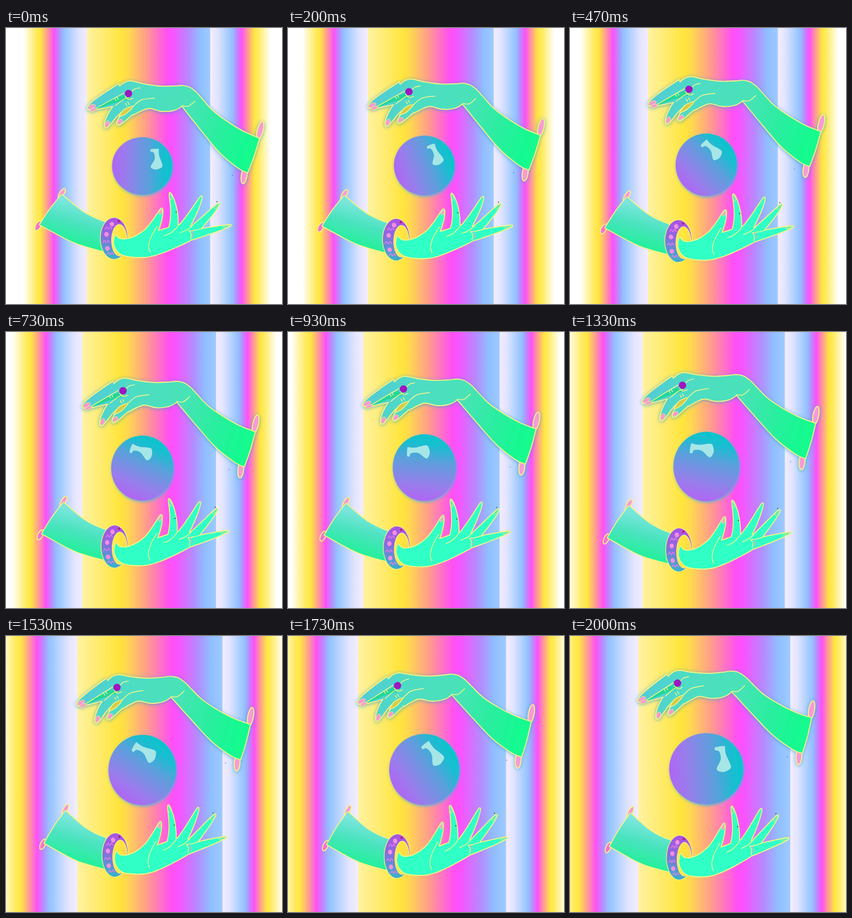
An HTML page that plays this animation: 480 by 480 pixels, repeating every 2070 ms.

```html
<!DOCTYPE html>
<html lang="en">
<head>
<meta charset="utf-8">
<title>Hands and orb</title>
<style>
html, body { margin: 0; width: 100%; height: 100%; overflow: hidden; background: #fff; }
svg { display: block; width: 100vw; height: 100vh; }
.line { fill: none; stroke: #f3f58c; stroke-width: 1.4; stroke-linecap: round; }
.rim { fill: none; stroke: #f6f383; stroke-width: 3.4; stroke-linejoin: round; }
.nail { fill: #f49ad2; stroke: #f6e98a; stroke-width: .8; }
.tip { fill: #4cf0bc; }
.cuff { fill: #f79ad8; stroke: #f6f383; stroke-width: 1.8; }
.hot { fill: #f672d2; }
.charm { fill: #f48fe0; }
.squiggle { fill: none; stroke: #f07be6; stroke-width: 1.4; }
</style>
</head>
<body>
<svg viewBox="0 0 480 480" preserveAspectRatio="none">
  <defs id="defs">
    <filter id="halo" x="-20%" y="-20%" width="140%" height="140%">
      <feDropShadow dx="0" dy="1" stdDeviation="3" flood-color="#2f9fc8" flood-opacity=".75"/>
    </filter>
    <filter id="orbHalo" x="-20%" y="-20%" width="140%" height="140%">
      <feDropShadow dx="1" dy="2" stdDeviation="2.4" flood-color="#46b4e0" flood-opacity=".9"/>
    </filter>
  </defs>
  <rect id="left" width="300" height="480" fill="url(#side)"/>
  <rect id="right" width="300" height="480" fill="url(#side)"/>
  <rect id="mid" width="1" height="480" fill="url(#center)"/>
  <g filter="url(#orbHalo)"><g id="orb"></g></g>
  <g id="lower"></g>
  <g filter="url(#halo)"><g id="upper"></g></g>
</svg>
<script>
const $ = id => document.getElementById(id);
const NS = 'http://www.w3.org/2000/svg';
const mix = (a, b, p) => a + (b - a) * p;

function add(parent, tag, attrs) {
  const el = document.createElementNS(NS, tag);
  for (const k in attrs) el.setAttribute(k, attrs[k]);
  return parent.appendChild(el);
}

function gradient(id, [x1, y1, x2, y2], stops) {
  const g = add($('defs'), 'linearGradient', { id, x1, y1, x2, y2, gradientUnits: 'userSpaceOnUse' });
  for (const s of stops.split(', ')) {
    const [color, offset] = s.split(' ');
    add(g, 'stop', { 'stop-color': color, offset });
  }
}

gradient('side', [0, 0, 111, 0],
  '#f3edff 0, #e2e4ff .12, #a5ccff .3, #94bfff .37, #b98bff .44, #ff50f8 .52, #ff9a96 .62, #ffe640 .73, #ffeb62 .8, #fff 1');
gradient('center', [0, 0, 1, 0],
  '#fff2a2 0, #ffe53c .28, #ffd850 .34, #ff9c8c .48, #ff50f4 .65, #f754ff .7, #b48cff .83, #90bfff .92, #9fcaff 1');
gradient('ball', [-1, 0, 1, 0], '#b065f4 0, #9a7cec .22, #5c9fdc .6, #16bfd0 .86, #0cc4cc 1');
gradient('jade', [150, 120, 425, 215], '#52cbd8 0, #4edcc4 .25, #4ae2b8 .55, #2eeca2 .75, #12fb8e 1');
gradient('sleeve', [130, 308, 112, 374], '#7ae6dc 0, #4ce3c0 .45, #22f09a 1');
gradient('band', [205, 332, 176, 402], '#b04fe4 0, #8a6ade .5, #2cbcc8 1');

// Smooth path through "x,y x,y ..." points; "|" marks a sharp corner.
function smooth(text) {
  let d = '', last;
  for (const run of text.split('|')) {
    const p = run.trim().split(/\s+/).map(s => s.split(',').map(Number));
    if (last) p.unshift(last);
    else d = 'M' + p[0];
    for (let i = 0; i < p.length - 1; i++) {
      const a = p[i - 1] || p[i], b = p[i], c = p[i + 1], e = p[i + 2] || c;
      const h1 = b.map((v, k) => v + (c[k] - a[k]) / 6);
      const h2 = c.map((v, k) => v - (e[k] - b[k]) / 6);
      d += `C${h1} ${h2} ${c}`;
    }
    last = p[p.length - 1];
  }
  return d;
}

// Tapered finger along a curve from base over bend to tip, half width w0 to w1.
function finger([x0, y0], [cx, cy], [x1, y1], w0, w1) {
  const near = [], far = [], n = 16;
  for (let i = 0; i <= n; i++) {
    const t = 1 - (1 - i / n) ** 2, u = 1 - t;
    const x = u * u * x0 + 2 * u * t * cx + t * t * x1;
    const y = u * u * y0 + 2 * u * t * cy + t * t * y1;
    const dx = mix(cx - x0, x1 - cx, t), dy = mix(cy - y0, y1 - cy, t);
    const w = mix(w0, w1, t) * Math.sqrt(1 - t ** 8) / Math.hypot(dx, dy);
    near.push([x - dy * w, y + dx * w]);
    far.unshift([x + dy * w, y - dx * w]);
  }
  return 'M' + [...near, ...far].join('L') + 'Z';
}

const oval = (x, y, rx, ry) =>
  `M${x - rx},${y}a${rx} ${ry} 0 1 0 ${2 * rx} 0a${rx} ${ry} 0 1 0 ${-2 * rx} 0Z`;

// One outline around all parts together.
function merge(g, fill, ...parts) {
  for (const d of parts) add(g, 'path', { d, class: 'rim' });
  for (const d of parts) add(g, 'path', { d, fill });
}

const path = (g, pts, fill) => add(g, 'path', { d: smooth(pts), fill });
const line = (g, pts, cls = 'line') => add(g, 'path', { class: cls, d: smooth(pts) });
const dot = (g, cx, cy, r, fill) => add(g, 'circle', { cx, cy, r, fill });
const nail = (g, x, y, rx, ry, turn, cls = 'nail') =>
  add(g, 'ellipse', { class: cls, rx, ry, transform: `translate(${x} ${y}) rotate(${turn})` });

function drawOrb(g) {
  dot(g, 0, 0, 1, 'url(#ball)');
  path(g, '.27,-.58 .4,-.6 .55,-.6|.56,-.36 .67,-.02 .57,.09 .42,.12 .28,.03 .41,-.24 .38,-.46 .27,-.5|.27,-.58', '#a6e6e6');
}

function drawUpper(g) {
  nail(g, 442, 178, 5, 16, 14, 'cuff');
  nail(g, 414, 257, 5, 14, 8, 'cuff');
  merge(g, 'url(#jade)',
    smooth('300,101 313,102 329,111 340,123 360,145 387,165 414,181 440,192|431,222 420,251|404,243 372,216 341,179 306,135|300,101'),
    smooth('192,108 204,97 217,93 240,98 270,102 313,102 329,111|306,135 290,143 270,144 250,139 236,143 222,150|204,136 192,108'),
    finger([202, 115], [172, 126], [142, 140], 18, 5),
    finger([206, 130], [186, 144], [173, 173], 10, 4.5),
    finger([234, 130], [211, 146], [194, 168], 9, 4.5));
  add(g, 'path', { d: finger([215, 119], [185, 126], [157, 140], 5, 2), fill: '#22d79a' });
  path(g, '196,155 205,142 221,136 209,149 196,155', '#d6cc48').setAttribute('class', 'line');
  g.lastChild.style.fill = '#d6cc48';
  line(g, '156,140 174,130 205,113');
  line(g, '190,135 205,124 214,121');
  line(g, '221,136 236,125 258,122');
  line(g, '219,110 224,106 233,104');
  line(g, '329,127 317,136 306,135');
  for (const [x, y] of [[189, 122], [208, 131]])
    for (const s of [0, 4]) line(g, `${x + s},${y - s / 2} ${x + s + 2},${y - s / 2 + 4}`);
  nail(g, 149, 137, 7, 3.4, -24);
  nail(g, 152, 142, 6, 2.6, -20);
  nail(g, 176, 167, 3.6, 6, 26);
  nail(g, 198, 163, 5.5, 3.5, -42);
  line(g, '207,118 213,124 221,122');
  dot(g, 213, 114, 6.4, '#a016c0');
  dot(g, 394, 256, .7, '#355b78');
}

function drawBracelet(g) {
  const d = oval(188, 366, 23.5, 36) + oval(197, 369, 14, 28);
  add(g, 'path', { d, class: 'rim' }).style.strokeWidth = 2.4;
  add(g, 'path', { d, fill: 'url(#band)', 'fill-rule': 'evenodd' });
  for (let i = 0; i < 6; i++) {
    const a = .44 * i - 1.2, x = 190 - 16 * Math.cos(a), y = 368 + 29 * Math.sin(a);
    if (i % 2) line(g, [-6, -3, 0, 3, 6].map((s, k) => `${x + s},${y + (k % 2 ? -2 : 2)}`).join(' '), 'squiggle');
    else nail(g, x, y, 3.8, 4, -20, 'charm');
  }
  dot(g, 196, 336, 2, '#c0186c');
}

function drawLower(g) {
  nail(g, 97, 288, 4, 10, 32, 'cuff');
  nail(g, 56, 344, 4.5, 9, 28, 'cuff hot');
  merge(g, 'url(#sleeve)',
    smooth('97,290 130,317 155,331 182,341|180,391|140,380 110,369 59,342|76,316 97,290'));
  drawBracelet(g);
  merge(g, '#30ffc6',
    smooth('190,360 198,367 212,367 228,361 248,347|262,353 282,348 300,343 322,345 340,350|327,365 300,379 268,392 243,398 214,397 197,391 188,376 190,360'),
    finger([240, 372], [263, 343], [271, 314], 13, 3),
    finger([289, 356], [298, 325], [285, 287], 8, 2.6),
    finger([304, 354], [325, 326], [340, 293], 9, 2.6),
    finger([322, 356], [348, 331], [371, 305], 8, 2.4),
    finger([322, 360], [358, 352], [391, 343], 8, 1.6));
  line(g, '263,345 252,364 248,380 251,390');
  line(g, '301,341 297,347 287,356 276,361');
  line(g, '324,344 315,351 303,356');
  line(g, '341,349 328,352 318,353');
  line(g, '319,353 322,359 321,367');
  line(g, '323,353 326,359 325,364').style.stroke = '#f49ad2';
  nail(g, 269, 320, 2.2, 4.5, 20);
  nail(g, 286.5, 294, 2, 5, -14, 'nail tip');
  nail(g, 366, 310, 5, 2, -45, 'nail tip');
  nail(g, 383, 345, 6, 1.5, -12, 'nail tip');
  dot(g, 296, 320, 1.1, '#27604e');
  dot(g, 367, 302, 1, '#27604e');
}

drawOrb($('orb'));
drawUpper($('upper'));
drawLower($('lower'));

const LOOP = 2070, LAST = 30, STEP = 200 / 3;
const move = (id, t) => $(id).setAttribute('transform', t);

function draw(p) {
  // The middle panel widens and pushes the side panels outward.
  const l = mix(141, 119, p), r = mix(355, 383, p);
  move('left', `translate(${l}) scale(${-mix(1, 1.28, p)} 1)`);
  move('mid', `translate(${l}) scale(${r - l} 1)`);
  move('right', `translate(${r}) scale(.95 1)`);

  // The orb grows, swings a quarter turn left and comes back.
  const rx = 52.5 + 3 * p + 9 * p ** 3, ry = 50 + 12 * Math.sin(p * Math.PI / 2);
  const turn = -100 * Math.min(p / .56, (1.02 - p) / .46);
  move('orb', `translate(237 ${240 - 9 * p}) scale(${rx} ${ry}) rotate(${turn})`);

  move('upper', `translate(${-26 * p} ${-32 * p}) rotate(${-4.3 * p} 213 114)`);
  move('lower', `translate(${mix(98, 106, p)} ${mix(284, 302, p)}) ` +
    `matrix(${mix(1, .937, p)} ${-.045 * p} 0 ${mix(1, 1.067, p)} 0 0) translate(-98 -284)`);
}

const start = performance.now();
function tick() {
  const t = (performance.now() - start) % LOOP;
  draw(Math.min(LAST, Math.floor((t + 3.4) / STEP)) / LAST);
  requestAnimationFrame(tick);
}
tick();
</script>
</body>
</html>
```
